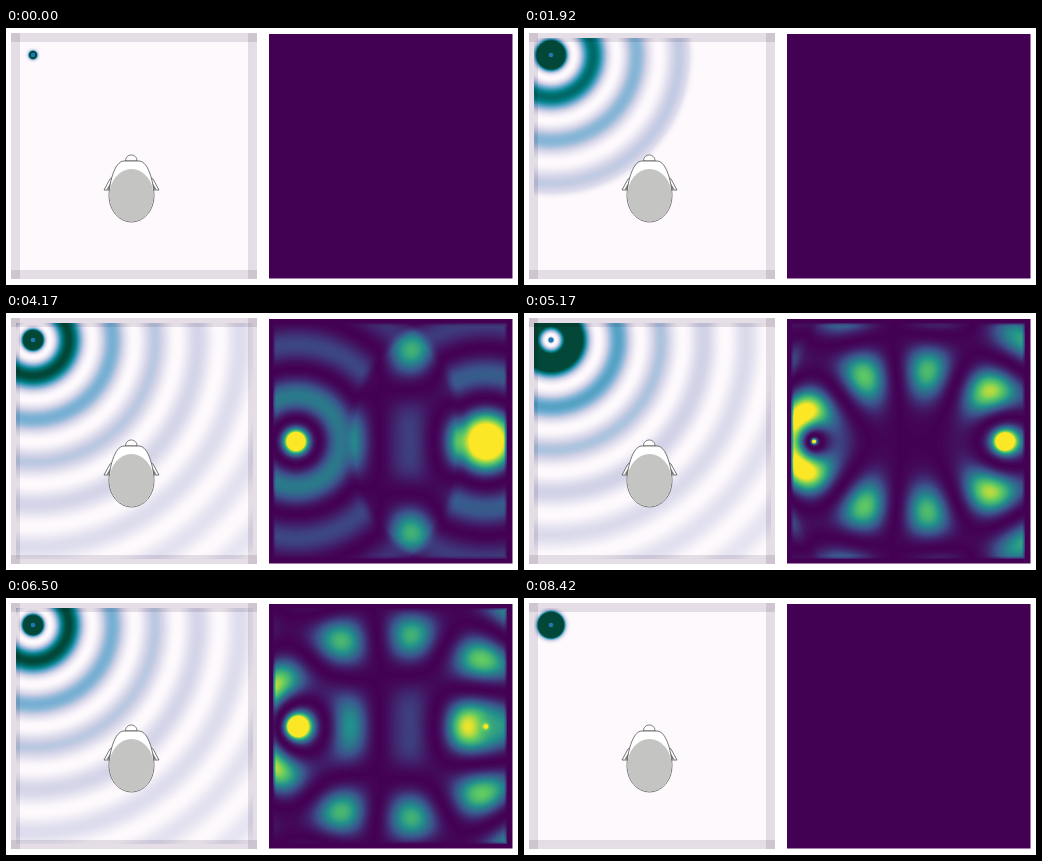
Recreate the animation shown at these times as an HTML page with a canvas. Size 512x257 px, loop 8.51 s.

```html
<!DOCTYPE html>
<html lang="en">
<head>
<meta charset="utf-8">
<title>Sound field at the ears</title>
<style>
  html, body { margin: 0; width: 100%; height: 100%; overflow: hidden; background: #fff; }
  canvas { display: block; width: 100vw; height: 100vh; }
</style>
</head>
<body>
<canvas id="stage" width="512" height="257"></canvas>
<script>
const LOOP = 8510, STEP = 1000 / 12, RESTART = 100;
const ctx = document.getElementById('stage').getContext('2d');

const puBuGn = palette('#fffafd', '#d0d1e6', '#67a9cf', '#02818a', '#014636');
const viridis = palette('#440154', '#3b528b', '#21918c', '#5ec962', '#fde725');

// 256 colours blended between evenly spaced stops
function palette(...stops) {
  const strip = document.createElement('canvas');
  strip.width = 256;
  strip.height = 1;
  const brush = strip.getContext('2d');
  const gradient = brush.createLinearGradient(0, 0, 256, 0);
  stops.forEach((colour, i) => gradient.addColorStop(i / (stops.length - 1), colour));
  brush.fillStyle = gradient;
  brush.fillRect(0, 0, 256, 1);
  const { data } = brush.getImageData(0, 0, 256, 1);
  return Array.from({ length: 256 }, (_, i) => data.subarray(4 * i, 4 * i + 4));
}

// A rectangle of the stage coloured from a value function of (x, y, n)
function makeField(x0, y0, w, h, colours, value) {
  const image = ctx.createImageData(w, h);
  return n => {
    for (let y = 0, p = 0; y < h; y++) {
      for (let x = 0; x < w; x++, p += 4) {
        const v = Math.min(1, value(x0 + x + .5, y0 + y + .5, n));
        image.data.set(colours[Math.round(v * 255)], p);
      }
    }
    ctx.putImageData(image, x0, y0);
  };
}

// Outgoing circular wave at distance r; front is the radius reached so far
function wave(r, front, halfLength, decay) {
  const s = front - r;
  if (s <= 0) return 0;
  return Math.min(1, s / 12) * Math.sin(Math.PI * s / halfLength) / Math.max(r, 1) ** decay;
}

const drawRoom = makeField(10, 10, 237, 236, puBuGn, (x, y, n) => {
  const p = wave(Math.hypot(x - 27, y - 27), 11 + 6.05 * n, 42.35, .5);
  return 37 * p * p;
});

const drawEars = makeField(267, 10, 234, 236, viridis, (x, y, n) => {
  const front = 80 + 50 / 7 * (n - 37);
  const p = wave(Math.hypot(x - 290, y - 128.5), front, 50, .45)
          + wave(Math.hypot(x - 480, y - 128.5), front - 29, 50, .45);
  const shade = 1 - .4 * Math.exp(-(((x - 395) / 35) ** 2) - ((y - 128) / 40) ** 2);
  const edge = Math.min(1, Math.min(x - 266, 502 - x, y - 9, 247 - y) / 4);
  return 13 * (p * shade) ** 2 * edge;
});

function rect(colour, x, y, w, h) {
  ctx.fillStyle = colour;
  ctx.fillRect(x, y, w, h);
}

function shape(path, fill, stroke) {
  ctx.fillStyle = fill;
  ctx.fill(path);
  if (!stroke) return;
  ctx.strokeStyle = stroke;
  ctx.lineWidth = .8;
  ctx.stroke(path);
}

function ellipse(x, y, rx, ry = rx) {
  const path = new Path2D();
  path.ellipse(x, y, rx, ry, 0, 0, 2 * Math.PI);
  return path;
}

// Bars overlap in the corners, which darkens them
function drawWalls() {
  ctx.globalCompositeOperation = 'multiply';
  for (const at of [5, 242]) {
    rect('#e6e3e8', 5, at, 246, 9);
    rect('#e6e3e8', at, 5, 9, 246);
  }
  ctx.globalCompositeOperation = 'source-over';
}

const nose = new Path2D('M119.5 133 C119.5 125 131 125 131 133 Z');
const ear = new Path2D('M-18 149 L-21.5 151 L-27.5 162 H-21 Z');
const earHole = new Path2D('M-21 155 L-25 161.5 H-21 Z');
const skull = new Path2D('M103 168 C103 157 108 133 118 133 H133 C143 133 148 157 148 168 A22.5 26 0 0 1 103 168 Z');
const hair = ellipse(125.5, 167.3, 22, 26.3);

function drawHead() {
  const line = '#555';
  shape(nose, '#fff', line);
  for (const side of [1, -1]) {
    ctx.save();
    ctx.translate(125.5, 0);
    ctx.scale(side, 1);
    shape(ear, '#fff', line);
    shape(earHole, '#777');
    ctx.restore();
  }
  shape(skull, '#fff', line);
  shape(hair, '#c4c4c2');
}

function draw(n) {
  rect('#fff', 0, 0, 512, 257);
  rect('#fffafd', 5, 5, 246, 246);
  drawRoom(n);
  drawWalls();
  shape(ellipse(27, 27, 2.3), '#1f77b4');
  drawHead();
  rect('#440154', 263, 6, 243.5, 244.5);
  drawEars(n);
}

let shown = -1;
function tick() {
  const step = Math.min(101, Math.floor((performance.now() % LOOP + 5) / STEP));
  if (step !== shown) {
    shown = step;
    draw(step < RESTART ? step : step - RESTART + 1);
  }
  requestAnimationFrame(tick);
}
tick();
</script>
</body>
</html>
```
